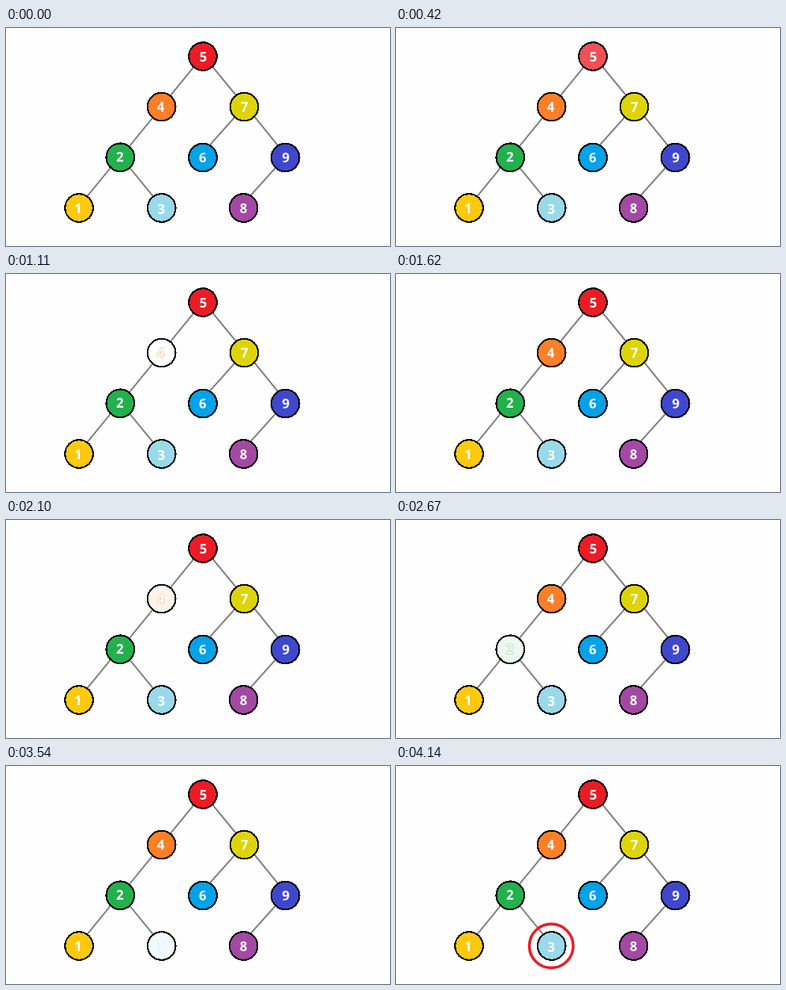
Animation, 515 px wide and 292 px high, one loop 5.85 s. Source, as an HTML page:

```html
<!DOCTYPE html>
<html lang="en">
<head>
<meta charset="utf-8">
<title>Tree search</title>
<style>
  html, body { margin: 0; width: 100%; height: 100%; overflow: hidden; background: #fefefe; }
  svg { display: block; width: 100vw; height: 100vh; }
  .edge { stroke: #7f7f7f; stroke-width: 2; }
  .disc { stroke: #000; stroke-width: 2.2; shape-rendering: crispEdges; }
  text {
    font: 700 17.5px "Open Sans", "Noto Sans", sans-serif;
    text-anchor: middle;
    fill: #fff;
    paint-order: stroke;
    stroke-width: 1;
  }
  #ring { fill: none; stroke: #ed1c24; stroke-width: 3.7; }
</style>
</head>
<body>
<svg id="stage" viewBox="0 0 515 292">
  <g id="edges"></g>
  <g id="nodes"></g>
  <circle id="ring" cx="208.2" cy="241" r="29.4" opacity="0"/>
</svg>
<script>
const LOOP = 5850, TICK = 30, HALF = 145;

// key: x, y, colour, digit offset x, digit offset y
const nodes = {
  5: [264, 38, '#ed1c24', 0.5, 0],
  4: [208.7, 105.5, '#ff7f27', -1.2, 0],
  7: [319.5, 105.5, '#ded404', 0.3, 0],
  2: [153.3, 173.3, '#22b14c', -0.6, -0.8],
  6: [264, 173.5, '#00a2e8', -0.3, 0],
  9: [374.7, 173.5, '#3f48cc', 0.6, 0],
  1: [98, 241, '#ffc90e', -1.2, 0],
  3: [208.7, 241, '#99d9ea', -0.5, 1.2],
  8: [318.6, 241, '#a349a4', 0, 0]
};

// parent, child, sideways shift, lift of the lower end
const links = [
  [5, 4, -0.5, 0], [5, 7, 1.6, 0], [4, 2, 0, 0], [7, 6, -0.3, 6],
  [7, 9, 3, 0], [2, 1, -1.8, 0], [2, 3, 1.3, 0], [9, 8, -1, 5]
];

// moments at which each visited node is fully white
const blinks = {
  5: [215, 532, 845],
  4: [1155, 1465, 1775, 2086],
  2: [2375, 2658, 2950],
  3: [3250, 3560, 3845]
};
const HOLD = { at: 1155, span: 48 };

const $ = id => document.getElementById(id);
const clamp = v => Math.min(1, Math.max(0, v));

function add(parent, tag, attrs, content = '') {
  const el = document.createElementNS('http://www.w3.org/2000/svg', tag);
  for (const name in attrs) el.setAttribute(name, attrs[name]);
  el.textContent = content;
  return parent.appendChild(el);
}

for (const [a, b, shift, lift] of links) {
  const [x1, y1] = nodes[a], [x2, y2] = nodes[b];
  add($('edges'), 'line',
    { class: 'edge', x1: x1 + shift, y1, x2: x2 + shift, y2: y2 - lift });
}

const parts = {};
for (const key in nodes) {
  const [cx, cy, fill, dx, dy] = nodes[key];
  const disc = add($('nodes'), 'circle', { class: 'disc', cx, cy, r: 18.8, fill });
  const digit = add($('nodes'), 'text',
    { x: cx + dx, y: cy + dy + 6.5, stroke: fill, 'stroke-opacity': 0 }, key);
  parts[key] = { disc, digit, rgb: [1, 3, 5].map(i => parseInt(fill.slice(i, i + 2), 16)) };
}

function whiteness(key, t) {
  return Math.max(...blinks[key].map(peak => {
    const flat = peak === HOLD.at ? HOLD.span : 0;
    const gap = Math.max(0, Math.abs(t - peak) - flat);
    return clamp(1 - gap / (HALF - flat));
  }));
}

function draw(now) {
  const t = Math.floor((now % LOOP) / TICK) * TICK;
  for (const key in blinks) {
    const w = whiteness(key, t), { disc, digit, rgb } = parts[key];
    const mix = rgb.map(c => Math.round(c + (255 - c) * w));
    disc.setAttribute('fill', `rgb(${mix})`);
    digit.setAttribute('stroke-opacity', 0.75 * w * w);
  }
  $('ring').setAttribute('opacity', clamp((t - 3990) / 150));
}

const start = performance.now();
function loop(now) {
  draw(Math.max(0, now - start));
  requestAnimationFrame(loop);
}
draw(0);
requestAnimationFrame(loop);
</script>
</body>
</html>
```
